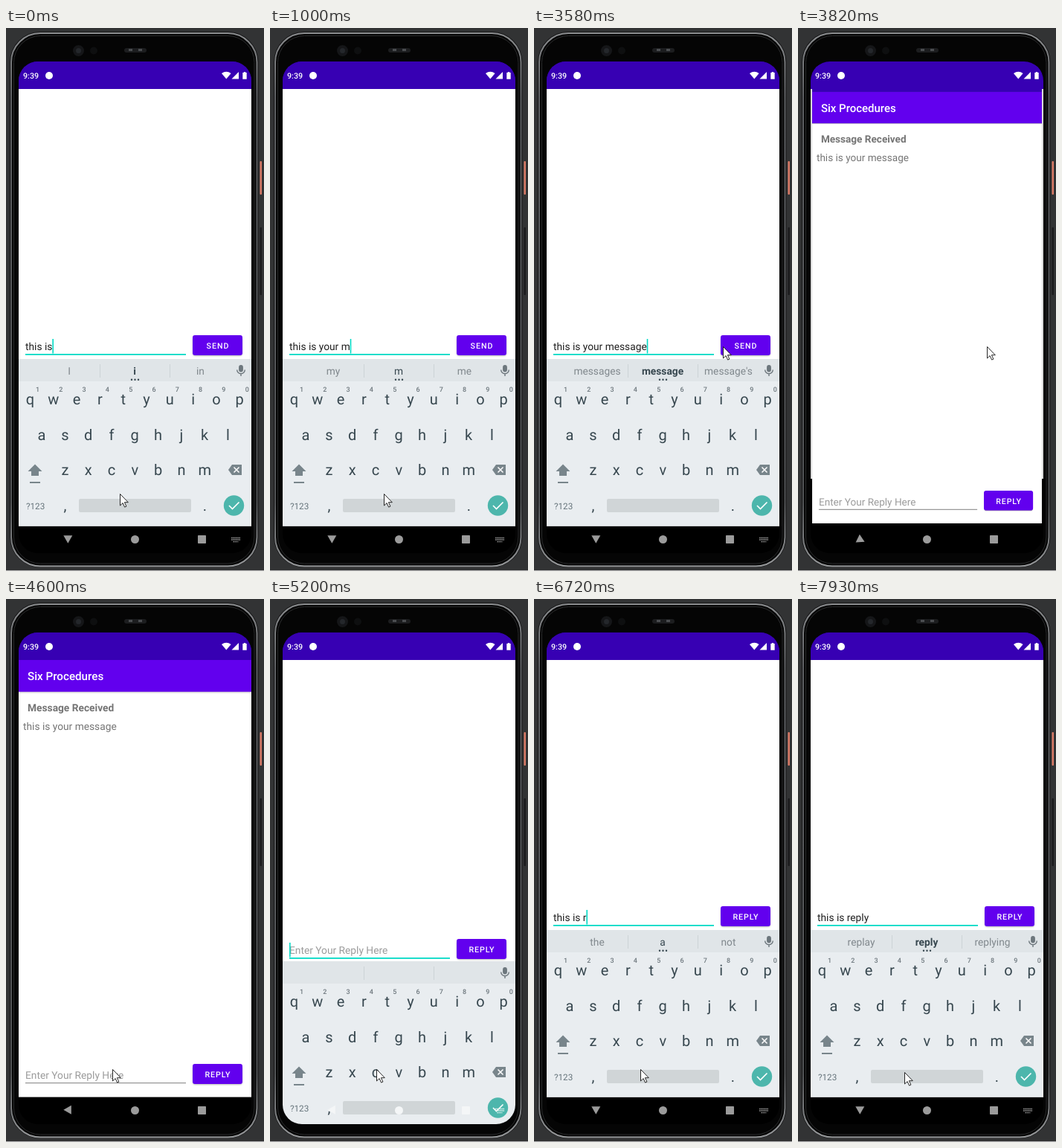
Recreate the animation shown at these times as an HTML page. Size 347x730 px, loop 8000 ms.

```html
<!DOCTYPE html>
<html lang="en">
<head>
<meta charset="utf-8">
<title>Message and reply</title>
<style>
  html, body { margin: 0; width: 100%; height: 100%; overflow: hidden; background: #323334; }
  svg { display: block; width: 347px; height: 730px; }
  text { font-family: Roboto, Arial, sans-serif; font-size: 13.75px; white-space: pre; text-rendering: geometricPrecision; }
  .mid { text-anchor: middle; }
  #keys text { fill: #37474f; font-size: 20px; text-anchor: middle; }
  #keys .digit { fill: #6d777d; font-size: 9px; font-weight: 500; }
  .side { fill: #80888d; }
</style>
</head>
<body>
<svg viewBox="0 0 347 730">
  <defs>
    <clipPath id="screen"><rect x="17" y="45" width="313" height="661" rx="26"/></clipPath>
    <linearGradient id="rim" x2="0" y2="1">
      <stop offset="0" stop-color="#8b8d8f"/><stop offset=".12" stop-color="#5c5e61"/>
      <stop offset=".88" stop-color="#505254"/><stop offset="1" stop-color="#97999b"/>
    </linearGradient>
    <filter id="soft" x="-20%" y="-30%" width="140%" height="180%"><feGaussianBlur stdDeviation=".8"/></filter>
  </defs>

  <!-- phone body -->
  <rect width="347" height="730" fill="#323334"/>
  <rect y="729" width="347" height="1" fill="#b5b5b5"/>
  <rect x="341.500" y="179" width="2.500" height="45" rx="1" fill="#dc7c68"/>
  <rect x="341.500" y="268" width="2.500" height="91" rx="1" fill="#1b1b1c"/>
  <rect x="5" y="5" width="334.500" height="720" rx="41" fill="#161617"/>
  <rect x="7" y="7" width="330.500" height="716.500" rx="39" fill="#060606" stroke="url(#rim)" stroke-width="2"/>
  <rect x="10.500" y="10.500" width="323.500" height="709.500" rx="36" fill="#050505" stroke="#2a2b2c"/>
  <circle cx="97.500" cy="30.500" r="7.500" fill="#151618"/>
  <circle cx="97.500" cy="30.500" r="3.500" fill="#24272b"/>
  <circle cx="118" cy="30.500" r="5" fill="#0e0f10"/>
  <rect x="159" y="27" width="30" height="6" rx="3" fill="#1c1d1f"/>
  <rect x="165" y="28" width="5" height="3" fill="#4b4d50"/>
  <rect x="178" y="28" width="5" height="3" fill="#4b4d50"/>

  <g clip-path="url(#screen)">
    <rect x="17" y="45" width="313" height="661"/>
    <rect x="17" y="45" width="313" height="37" fill="#3700b3"/>
    <rect x="17" y="82" width="313" height="524" fill="#dadada"/>

    <g id="app">
      <rect x="17" y="81" width="313" height="588.600" fill="#fff"/>
      <g id="page">
        <rect x="17" y="85" width="313" height="40.500" fill="#bbb" filter="url(#soft)"/>
        <rect x="17" y="82" width="313" height="42.700" fill="#6200ee"/>
        <text x="29" y="109" fill="#fff" style="font-size:15.2px;font-weight:500">Six Procedures</text>
        <text x="29" y="151" fill="#757575" font-weight="700">Message Received</text>
        <text x="23" y="176" fill="#757575">this is your message</text>
      </g>
      <rect x="17" y="45" width="313" height="37" fill="#3700b3"/>
      <g id="compose">
        <rect x="251.500" y="416" width="66" height="24.800" rx="3" fill="#aaa" filter="url(#soft)"/>
        <rect id="button" x="251" y="413" width="67" height="27" rx="3"/>
        <text id="label" class="mid" x="285" y="431" fill="#fff" style="font-size:10.7px;font-weight:500;letter-spacing:.95px"></text>
        <text id="field" x="26" y="433"></text>
        <rect id="line" x="26" width="216"/>
        <rect id="caret" y="418" width="1.600" height="19.500" fill="#03dac5"/>
      </g>
    </g>

    <g id="keyboard">
      <rect x="17" y="445" width="313" height="224.600" fill="#e9edf0"/>
      <rect x="17" y="445" width="313" height="30" fill="#e0e5e8"/>
      <path d="M126.500 452v18M220.500 452v18" stroke="#cdd3d6"/>
      <text id="left" class="mid side" x="85" y="466"></text>
      <text id="best" class="mid" x="173" y="466" fill="#37474f"></text>
      <text id="right" class="mid side" x="261.500" y="466"></text>
      <g id="dots" fill="#37474f">
        <circle cx="169" cy="472.800" r="1.200"/><circle cx="173.500" cy="472.800" r="1.200"/><circle cx="178" cy="472.800" r="1.200"/>
      </g>
      <g fill="none" stroke="#6d777d" stroke-width="1.400">
        <rect x="313.800" y="453.700" width="4.400" height="8" rx="2.200" fill="#6d777d"/>
        <path d="M310.700 459.500a5.300 5.300 0 0 0 10.600 0M316 465v3"/>
      </g>
      <g id="keys"></g>
      <path d="M39 586.500l9.500 9.500h-4.500v6h-10v-6h-4.500zM32 610h14v2h-14z" fill="#78858b"/>
      <path d="M299 594l5-7h13v14h-13z" fill="#78858b"/>
      <path d="M306.500 590.500l7 7m0-7l-7 7" stroke="#fff" stroke-width="1.500"/>
      <text x="27" y="646.500" fill="#66747b" style="font-size:11.700px">?123</text>
      <rect x="98" y="633" width="151" height="18" rx="2" fill="#d0d5d7"/>
      <circle cx="306.500" cy="642" r="13.700" fill="#4db6ac"/>
      <path d="M300 642l4.500 4.500 9-9" fill="none" stroke="#fff" stroke-width="1.600"/>
    </g>

    <g id="nav">
      <path id="back" d="M-6-4.500h12l-6 10.500z"/>
      <circle cx="173.500" cy="687.500" r="5.500"/>
      <rect x="258" y="682" width="11" height="11" rx=".8"/>
      <path id="imeIcon" d="M303 685.500h12M303 688h12M305.500 690.700h7" fill="none" stroke-width="1.300" stroke-dasharray="1.500 .6"/>
    </g>

    <!-- status bar -->
    <g fill="#fff">
      <text x="23" y="68" style="font-size:10.700px;font-weight:500">9:39</text>
      <circle cx="58" cy="64" r="5"/>
      <path d="M296.300 68.500l-6.300-7.500q6.300-4.500 12.600 0z"/>
      <path d="M313 59v9.500h-9.500z"/>
      <path d="M318.300 60h1.500v-1h2.400v1h1.500v8.800h-5.400z"/>
    </g>
  </g>
  <path id="pointer" d="M.5.500v15.500l3.600-3.400 2.500 5.500 2.300-1-2.500-5.400h4.900z" fill="#fff" stroke="#111" stroke-width=".9"/>
</svg>

<script>
const LOOP = 8000;
const $ = id => document.getElementById(id);
const NS = 'http://www.w3.org/2000/svg';

// time | field text | left, best, right suggestion (* = bold)
const typing = `0|this is|I,*i,in
120|this is |it,*is,it's
270|this is y|the,a,not
390|this is yo|you,y,yes
510|this is you|you,yo,your
630|this is your|your,*you,you're
760|this is your |you're,*your,yours
880|this is your m|own,new,best
1000|this is your m|my,m,me
1120|this is your me|my,m,me
1240|this is your mes|men,*me,meet
1360|this is your mess|message,mes,messages
1490|this is your mess|message,*mess,messages
1610|this is your messa|message,*mess,messages
1730|this is your messa|message,messa,messages
1880|this is your message|message,messag,messages
2030|this is your message|messages,*message,message's
3820||
5590|t|
5710|t|to,t,the
5830|th|to,t,the
5970|thi|that,*the,they
6090|this|this,*thi,think
6210|this |that,*this,these
6330|this i|is,the,was
6450|this is|I,*i,in
6570|this is |it,*is,it's
6720|this is r|the,a,not
6840|this is re|are,r,red
6960|this is rep|red,*re,really
7100|this is repl|report,*rep,reports
7230|this is reply|replace,repl,replied
7380|this is reply|replay,*reply,replying`.split('\n').map(row => {
  const [time, text, words] = row.split('|');
  return [+time, text, words ? words.split(',') : ['', '', '']];
});

const pointer = [[0, 153, 626], [2400, 165, 600], [2520, 198, 520], [2640, 222, 443], [2790, 237, 428],
  [2940, 250, 428], [3090, 254, 428], [4110, 251, 440], [4230, 230, 502], [4360, 190, 576],
  [4480, 158, 618], [4600, 143, 632], [7780, 143, 634], [7930, 143, 636]];
const caret = [[0, 1], [2400, 0], [2940, 1], [3340, 0], [3580, 1], [3820, 0], [5050, 1], [7930, 0]];
const zoom = [[0, 1], [3820, .987], [3970, .997], [4110, 1]];
const shift = [[0, 0], [3820, 212], [5200, 44], [5320, 15], [5440, 4], [5590, 0]];
const slide = [[0, 0], [3820, 300], [5200, 42], [5320, 14], [5440, 4], [5590, 0]];
const backAngle = [[0, 0], [3820, 176], [3970, 90], [5050, 45], [5200, 90], [5320, 0]];

const at = (table, t) => table.findLast(row => row[0] <= t);
const set = (id, attrs) => { for (const k in attrs) $(id).setAttribute(k, attrs[k]); };
const show = (id, on) => set(id, { visibility: on ? 'visible' : 'hidden' });

function key(label, x, y, cls = '') {
  const el = document.createElementNS(NS, 'text');
  el.textContent = label;
  el.setAttribute('x', x);
  el.setAttribute('y', y);
  el.setAttribute('class', cls);
  $('keys').append(el);
}
[['qwertyuiop', 32.5, 506], ['asdfghjkl', 48, 554], ['zxcvbnm', 79.5, 601.5]].forEach(([row, x, y], r) => {
  [...row].forEach((ch, i) => {
    key(ch, x + i * 31.3, y - .4);
    if (!r) key((i + 1) % 10, x + 10 + i * 31.3, 489, 'digit');
  });
});
key(',', 79.5, 649);
key('.', 267.5, 649);

let lastRow;
function write(row) {
  if (row === lastRow) return;
  lastRow = row;
  const [time, text, [left, best, right]] = row;
  const hint = !text;
  $('field').textContent = hint ? 'Enter Your Reply Here' : text;
  set('field', { fill: hint ? '#9b9b9b' : '#202020' });
  set('caret', { x: hint ? 26 : 26 + $('field').getComputedTextLength() });
  $('label').textContent = time < 3820 ? 'SEND' : 'REPLY';
  $('left').textContent = left;
  $('best').textContent = best.replace('*', '');
  set('best', { 'font-weight': best[0] === '*' ? 700 : 400 });
  $('right').textContent = right;
  show('dots', best);
}

function draw(t) {
  write(at(typing, t));
  const [, px, py] = at(pointer, t);
  const onPage = t >= 3820 && t < 5200;
  const focused = t < 3820 || t >= 4890;
  const sliding = t >= 5200 && t < 5440;

  set('pointer', { transform: `translate(${px} ${py})` });
  set('app', { transform: `translate(173.5 388) scale(${at(zoom, t)[1]}) translate(-173.5 -388)` });
  set('compose', { transform: `translate(0 ${at(shift, t)[1]})` });
  set('keyboard', { transform: `translate(0 ${at(slide, t)[1]})` });
  set('back', { transform: `translate(83.3 686.7) rotate(${at(backAngle, t)[1]})` });
  set('button', { fill: t >= 3700 && t < 3820 ? '#7826f0' : '#6200ee' });
  set('line', focused ? { y: 438, height: 1.8, fill: '#03dac5' } : { y: 438.2, height: 1, fill: '#7d7d7d' });
  set('nav', { fill: sliding ? '#f4f6f7' : '#9b9b9b' });
  set('imeIcon', { stroke: sliding ? '#e4f3f1' : '#9b9b9b' });
  show('page', onPage);
  show('caret', at(caret, t)[1]);
  show('imeIcon', t < 3820 || t >= 5050);
}

const start = performance.now();
function tick() {
  draw((performance.now() - start) % LOOP);
  requestAnimationFrame(tick);
}
draw(0);
requestAnimationFrame(tick);
</script>
</body>
</html>
```
